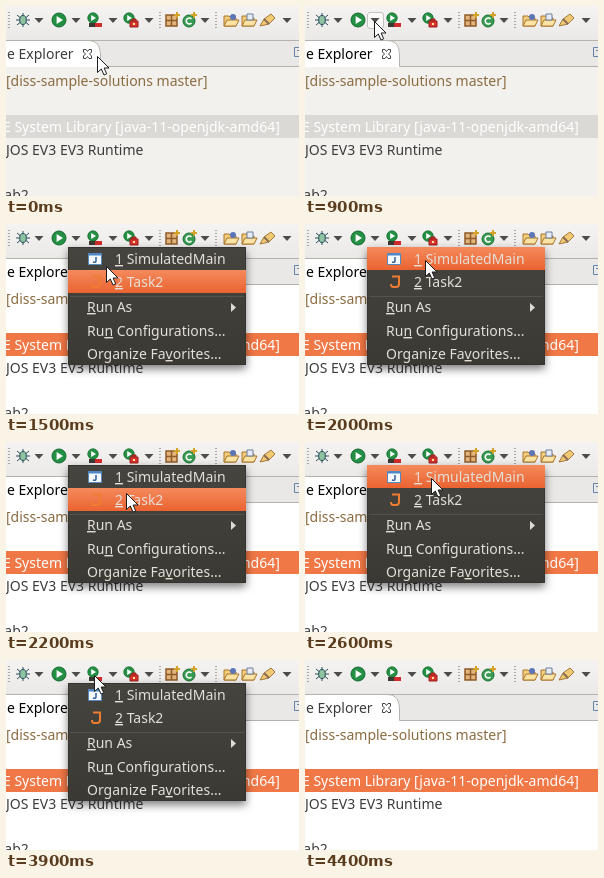
These frames come from a looping animation (293x190 px, 4500 ms). An HTML page:

```html
<!DOCTYPE html>
<html lang="en">
<head>
<meta charset="utf-8">
<title>Run menu</title>
<style>
  html, body { margin: 0; width: 100%; height: 100%; overflow: hidden; background: #f2f1ed; }
  svg { display: block; width: 100vw; height: 100vh; }
  text { font: 14px "Noto Sans", "Open Sans", sans-serif; white-space: pre; }
  .key { text-decoration: underline; }
  .panel { filter: drop-shadow(0 4px 4px rgba(0, 0, 0, .5)); }
</style>
</head>
<body>
<svg viewBox="0 0 293 190">
  <defs>
    <linearGradient id="bar" x2="0" y2="1">
      <stop stop-color="#f4f3f2"/><stop offset="1" stop-color="#ebe9e7"/>
    </linearGradient>
    <linearGradient id="glow" x2="0" y2="1">
      <stop stop-color="#f58a5c"/><stop offset="1" stop-color="#ea6331"/>
    </linearGradient>
    <linearGradient id="panel" x2="0" y2="1">
      <stop stop-color="#45443f"/><stop offset="1" stop-color="#3a3934"/>
    </linearGradient>
    <path id="caret" d="M-4.5 -2H4.5L0 3Z" fill="#4c4c4c"/>
    <g id="play">
      <circle r="7" fill="#249044" stroke="#12692d"/>
      <path d="M-2.4 -4L4 0L-2.4 4Z" fill="#fff"/>
    </g>
    <g id="folder" stroke="#a8742a">
      <path d="M-7 6V-4H-2L0 -2H5V6Z" fill="#f3ce7c"/>
      <path d="M-7 6L-4 0H8L5 6Z" fill="#fbe3a4"/>
    </g>
    <path id="grip" d="M0 6V23" stroke="#aaa7a2" stroke-width="2" stroke-dasharray="1 2"/>
  </defs>

  <!-- Toolbar -->
  <rect width="293" height="35" fill="url(#bar)"/>
  <rect id="hover" y="6.5" height="16" rx="2.5" fill="#fbfaf9" stroke="#c5c1bc"/>
  <use href="#grip" x="3"/>
  <g transform="translate(17 14)" stroke="#294f5c" fill="none">
    <path d="M-6 -5L6 5M-6 5L6 -5M-7 0H7M0 -7V7"/>
    <ellipse rx="3.3" ry="4.5" fill="#8fc2a1"/>
  </g>
  <use href="#play" x="53" y="14"/>
  <g transform="translate(88 13)">
    <use href="#play" transform="translate(-1 -1) scale(.75)"/>
    <path d="M-5 4H8V8H-5Z" fill="#d22b2b"/><path d="M-5 4H1V8H-5Z" fill="#3b3a32"/>
  </g>
  <g transform="translate(124 13)">
    <use href="#play" transform="translate(-1 -1) scale(.75)"/>
    <path d="M0 2H8V8H0ZM2 2V0H6V2" fill="#d8342d" stroke="#981d1d"/>
    <path d="M3 5H5" stroke="#ffe7a3" stroke-width="2"/>
  </g>
  <use href="#grip" x="154"/>
  <g transform="translate(166 14)">
    <path d="M-6 -5H5V6H-6ZM-.5 -5V6M-6 .5H5" fill="#e2b57c" stroke="#8f5a29" stroke-width="1.5"/>
    <path d="M5 -8V-2M2 -5H8" stroke="#d2a22b" stroke-width="2"/>
  </g>
  <g transform="translate(183 15)">
    <circle r="6" fill="#389b51" stroke="#1c7135"/>
    <path d="M2.5 -2A3 3 0 1 0 2.5 2" fill="none" stroke="#fff" stroke-width="1.6"/>
    <path d="M5 -9V-3M2 -6H8" stroke="#d2a22b" stroke-width="2"/>
  </g>
  <use href="#grip" x="210"/>
  <use href="#folder" x="225" y="14"/>
  <circle cx="227" cy="11" r="3" fill="#5b75b6"/>
  <use href="#folder" x="243" y="14"/>
  <path d="M241 8H247V14H241Z" fill="#e8edf5" stroke="#6d7f9f"/>
  <path d="M254 20L258 13L265 8L269 12L263 18Z" fill="#f0ca73" stroke="#a4783a"/>
  <path d="M258 13L263 18" stroke="#8a6b56" stroke-width="2"/>
  <g id="carets"></g>

  <!-- Tab strip -->
  <rect y="34" width="293" height="27" fill="#e9e8e6"/>
  <path d="M0 34.5H82C91 34.5 94.5 40 94.5 50V61H0Z" fill="#fff"/>
  <path d="M0 34.5H293M82 34.5C91 34.5 94.5 40 94.5 50V60.5H293" fill="none" stroke="#b5b2ae"/>
  <text id="title" x="1" y="53">e Explorer</text>
  <path d="M77.5 43.5H80L81.5 45.5L83 43.5H85.5V46L83.5 48L85.5 50V52.5H83L81.5 50.5L80 52.5H77.5V50L79.5 48L77.5 46Z" fill="#fff" stroke="#444"/>
  <path d="M294 41.5H288.5V50.5H294M291 44.5H294" fill="none" stroke="#6682a8"/>

  <!-- Tree -->
  <rect id="tree" y="61" width="293" height="129"/>
  <text x="0" y="80" fill="#8b6b40">[diss-sample-solutions master]</text>
  <rect id="selection" y="109" width="293" height="23"/>
  <text x="-3" y="126" fill="#fff">E System Library [java-11-openjdk-amd64]</text>
  <text x="0" y="149" fill="#3c3c3c">JOS EV3 EV3 Runtime</text>
  <text x="-9" y="194" fill="#3c3c3c">Lab2</text>

  <!-- Drop-down menu -->
  <g id="menu">
    <rect class="panel" x="62.5" y="23.5" width="177" height="117" fill="url(#panel)" stroke="#35342f"/>
    <rect id="highlight" x="62" width="178" height="23" fill="url(#glow)"/>
    <path d="M82.5 29.5H95.5V40.5H82.5Z" fill="#f5f8fc" stroke="#5687bd"/>
    <path d="M83 30.5H95" stroke="#4c86c6" stroke-width="2"/>
    <path d="M90 33V37Q90 39 87 38" fill="none" stroke="#315f9b" stroke-width="1.5"/>
    <path d="M87 52.5H94V60Q94 63 91 63H88Q86 63 86 60" fill="none" stroke="#ee7c31" stroke-width="2"/>
    <path d="M64 72.5H238" stroke="#55534d"/>
    <path d="M225 79L230 83.5L225 88Z" fill="#dfdbd2"/>
    <g fill="#e4e0d8">
      <text x="109" y="40"><tspan class="key">1</tspan> SimulatedMain</text>
      <text x="109" y="63"><tspan class="key">2</tspan> Task2</text>
      <text x="81" y="88"><tspan class="key">R</tspan>un As</text>
      <text x="81" y="112">Ru<tspan class="key">n</tspan> Configurations...</text>
      <text x="81" y="135">Organize Fa<tspan class="key">v</tspan>orites...</text>
    </g>
  </g>

  <path id="cursor" d="M0 0V16L3.8 12.5L6.5 18.5L9.2 17.3L6.6 11.5H11.5Z" fill="#fff" stroke="#1c1c1c" stroke-linejoin="round"/>
</svg>
<script>
const LOOP = 4500, TITLE_ACTIVE = 800, MENU_OPEN = 1100, MENU_CLOSE = 4000, CURSOR_GONE = 4400;
const byId = id => document.getElementById(id);
const show = (id, on) => byId(id).setAttribute("visibility", on ? "visible" : "hidden");
const set = (id, attrs) => {
  for (const name in attrs) byId(id).setAttribute(name, attrs[name]);
};

byId("carets").innerHTML = [33, 70, 107, 143, 199, 281]
  .map(x => `<use href="#caret" x="${x}" y="14"/>`).join("");

// Time, pointer x, pointer y, highlighted menu row (0 = none)
const steps = [
  [0, 91, 50, 0], [400, 101, 57, 0], [500, 87, 36, 0], [600, 69, 14, 0],
  [800, 68, 16, 0], [900, 69, 15, 0], [1300, 76, 17, 1],
  [1500, 100, 42, 2], [1600, 115, 49, 2], [1700, 121, 46, 2],
  [1900, 121, 41, 1], [2000, 120, 36, 1], [2100, 120, 41, 1], [2200, 120, 51, 2],
  [2400, 141, 34, 2], [2600, 126, 36, 1], [2700, 120, 40, 1],
  [3700, 115, 30, 1], [3800, 100, 22, 1], [3900, 88, 15, 0], [4000, 66, 14, 0]
];

function pointerAt(t) {
  let [, x, y, row] = steps.findLast(step => step[0] <= t);
  if (t >= 3100 && t < 3700) {
    const turn = Math.min(4, Math.floor((t - 3100) / 100)) * 1.3;
    x = 127 - 8 * Math.cos(turn);
    y = 37 - 6 * Math.sin(turn);
  }
  return { x, y, row };
}

function draw(now) {
  const t = now % LOOP;
  const { x, y, row } = pointerAt(t);
  const focused = t >= MENU_OPEN;
  const menuOpen = focused && t < MENU_CLOSE;
  const onArrow = t >= 600 && !focused;
  const onButton = t >= MENU_CLOSE && t < CURSOR_GONE;

  set("cursor", { transform: `translate(${x + .5} ${y + .5})` });
  show("cursor", t < CURSOR_GONE);
  show("hover", onArrow || onButton);
  set("hover", onButton ? { x: 46.5, width: 32 } : { x: 62.5, width: 16 });
  set("title", { fill: t >= TITLE_ACTIVE && t < CURSOR_GONE ? "#000" : "#3c3c3c" });
  set("tree", { fill: focused ? "#fff" : "#f2f1ed" });
  set("selection", { fill: focused ? "#f07746" : "#dad9d5" });
  show("menu", menuOpen);
  show("highlight", menuOpen && row > 0);
  set("highlight", { y: row === 2 ? 46 : 23 });
  requestAnimationFrame(draw);
}
requestAnimationFrame(draw);
</script>
</body>
</html>
```
